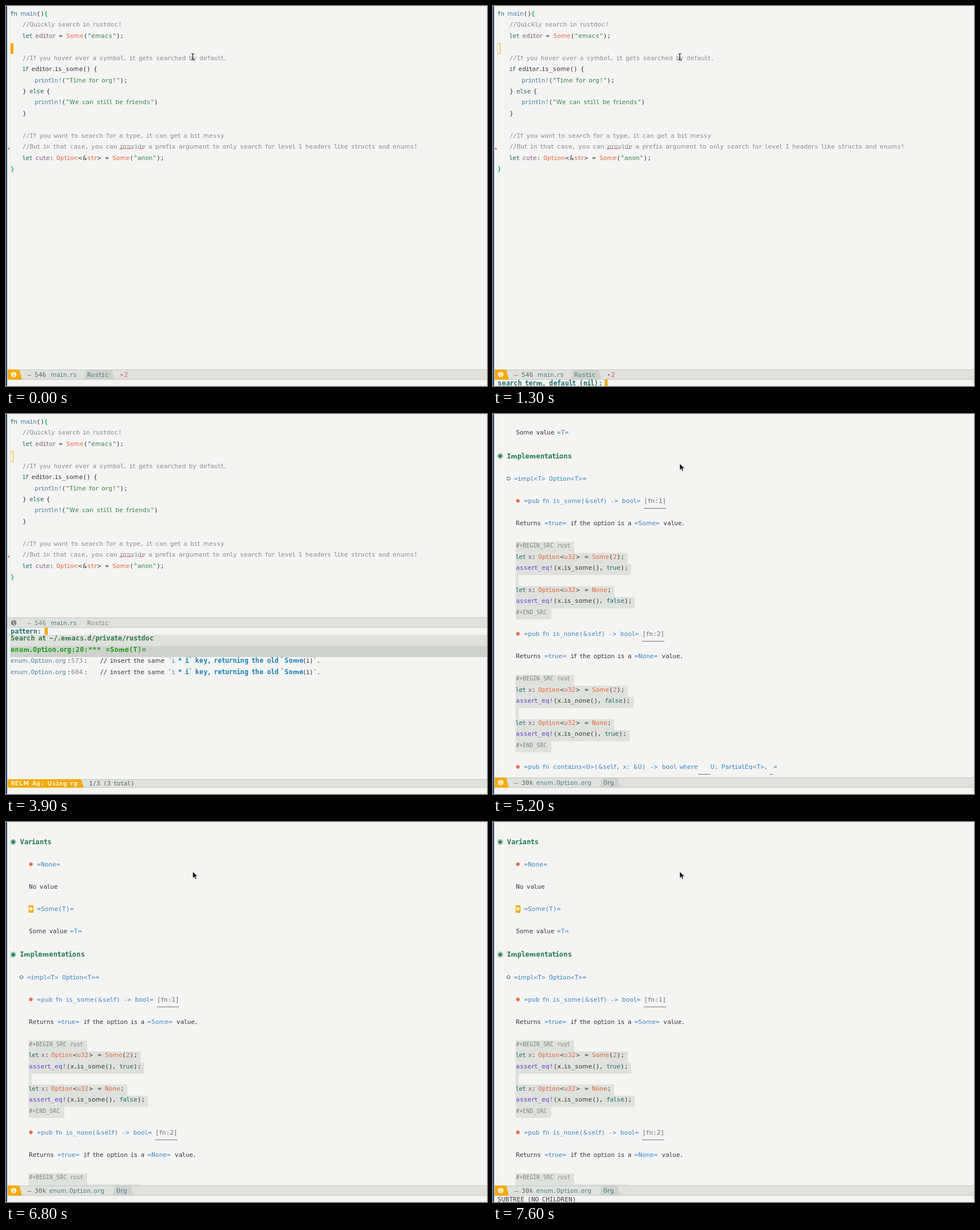
These frames come from a looping animation (841 px wide and 666 px high, 8000 ms). An HTML page:

```html
<!DOCTYPE html>
<html lang="en">
<head>
<meta charset="utf-8">
<title>Rustdoc search</title>
<style>
html, body { margin: 0; width: 100%; height: 100%; overflow: hidden; background: #f4f4f2; }
svg { display: block; }
text { font-family: "DejaVu Sans Mono", "Noto Sans Mono", monospace; text-anchor: middle; }
.wide { font-family: "DejaVu Sans", "Noto Sans", sans-serif; font-size: 90%; }
</style>
</head>
<body>
<svg id="stage" width="841" height="666" viewBox="0 0 841 666"></svg>
<script>
const NS = 'http://www.w3.org/2000/svg';
const stage = document.getElementById('stage');
const BG = '#f4f4f2', BAR = '#dfe1dc', DARK = '#cfd2cc', EDGE = '#c6c9c4', GOLD = '#f2ab0c';
const ROW = 19.43;
const ink = {
  fg: '#353a3c', key: '#1f6f70', fn: '#4a83a3', com: '#859090', vari: '#875a86',
  type: '#e2693f', str: '#35874c', match: '#15bd78', link: '#3a87ca', head: '#237a52',
  mac: '#6b3fd6', dim: '#7d8683', note: '#6b7274', file: '#4d7f8f', mode: '#58696c',
  pink: '#ee4f73', prompt: '#1f6f70', src: '#2f7a43', pick: '#17a01c', hit: '#1f80b8', pale: '#fbf4dc'
};

function add(parent, tag, attrs) {
  const el = document.createElementNS(NS, tag);
  for (const k in attrs) el.setAttribute(k, attrs[k]);
  parent.appendChild(el);
  return el;
}
const group = (parent = stage) => add(parent, 'g', {});
const rect = (g, x, y, width, height, fill) => add(g, 'rect', { x, y, width, height, fill });
const poly = (g, points, fill) => add(g, 'polygon', { points, fill });
const stroke = (g, d, color, w = 1) => add(g, 'path', { d, fill: 'none', stroke: color, 'stroke-width': w });
const show = (g, on) => g.setAttribute('display', on ? 'inline' : 'none');
const move = (g, y) => g.setAttribute('transform', `translate(0 ${y})`);

// Quasi-proportional spacing: a few classes of cell width.
function cell(c) {
  if (' fijlrt.,'.includes(c)) return 5.25;
  if ('mMW'.includes(c)) return 10;
  if (c === '&') return 8.5;
  if ('=<>~'.includes(c)) return 7.2;
  return c === '/' || c === 'I' ? 6.2 : 6.7;
}

// Each glyph is centred in its cell; wide letters use the proportional face.
function write(g, x, y, color, str, opt = {}) {
  const scale = opt.scale || 1;
  const el = add(g, 'text', { y: y + 4, fill: ink[color], 'font-size': opt.size || 11 });
  if (opt.bold) el.setAttribute('font-weight', 'bold');
  for (const part of str.split(/([mMW]+)/).filter(Boolean)) {
    const xs = [];
    for (const c of part) {
      const w = cell(c) * scale;
      xs.push((x + w / 2).toFixed(2));
      x += w;
    }
    const span = add(el, 'tspan', { x: xs.join(' ') });
    if (/[mMW]/.test(part)) span.setAttribute('class', 'wide');
    span.textContent = part;
  }
  return x;
}
const BOLD = { bold: true, scale: 1.1, size: 11.5 };
const HEAD = { bold: true, scale: 1.13, size: 12 };
const SMALL = { scale: 0.9, size: 9.6 };

// Runs are [x, color, text, options]; a null x continues the previous run.
function row(g, y, ...runs) {
  let end = 0;
  for (const [x, color, str, opt] of runs) end = write(g, x === null ? end : x, y, color, str, opt);
}

function badge(g, y, disc, digit) {
  add(g, 'circle', { cx: 13.5, cy: y, r: 4.8, fill: disc });
  add(g, 'text', { x: 13.5, y: y + 2.8, 'font-size': 7.5, 'font-weight': 'bold', fill: digit }).textContent = '1';
}

function bar(g, y, h = 18) {
  rect(g, 2, y, 839, h, BAR);
  rect(g, 2, y, 839, 1, EDGE);
  rect(g, 2, y + h - 1, 839, 1, EDGE);
}

function modeline(g, size, name, mode, x0, x1) {
  bar(g, 637);
  poly(g, '3,637 23,637 28,655 3,655', GOLD);
  badge(g, 646, ink.pale, GOLD);
  poly(g, `${x0 + 4},638 ${x1 - 4},638 ${x1},654 ${x0},654`, DARK);
  row(g, 646, [37.5, 'mode', '–'], [50, 'mode', size], [name[0], 'file', name[1]], [x0 + 6, 'file', mode]);
}

// ---- code buffer ----
const code = group();
const cy = k => 13 + ROW * k;
row(code, cy(0), [8, 'key', 'fn'], [25, 'fn', 'main'], [53.5, 'fg', '()'], [66.8, 'match', '{', { bold: true }]);
row(code, cy(1), [29, 'com', '//Quickly search in rustdoc!']);
row(code, cy(2), [29, 'key', 'let'], [51.2, 'vari', 'editor'], [92, 'fg', '='], [105.5, 'type', 'Some'],
  [135.7, 'fg', '('], [null, 'str', '"emacs"'], [null, 'fg', ');']);
row(code, cy(4), [29, 'com', '//If you hover over a symbol, it gets searched by default.']);
row(code, cy(5), [29, 'key', 'if'], [44.5, 'fg', 'editor.is_some() {']);
row(code, cy(6), [50, 'fn', 'println!'], [97.5, 'fg', '('], [104.2, 'str', '"Time for org!"'], [null, 'fg', ');']);
row(code, cy(7), [29, 'fg', '}'], [41, 'key', 'else'], [70.5, 'fg', '{']);
row(code, cy(8), [50, 'fn', 'println!'], [97.5, 'fg', '('], [104.2, 'str', '"We can still be friends"'], [null, 'fg', ')']);
row(code, cy(9), [29, 'fg', '}']);
row(code, cy(11), [29, 'com', '//If you want to search for a type, it can get a bit messy']);
row(code, cy(12), [29, 'com', '//But in that case, you can provide a prefix argument to only search for level 1 headers like structs and enums!']);
row(code, cy(13), [29, 'key', 'let'], [51.2, 'vari', 'cute'], [76.5, 'fg', ':'], [88.3, 'type', 'Option'],
  [126, 'fg', '<&'], [142, 'type', 'str'], [159.5, 'fg', '>'], [173, 'fg', '='], [186, 'type', 'Some'],
  [216.3, 'fg', '('], [null, 'str', '"anon"'], [null, 'fg', ');']);
row(code, cy(14), [8, 'match', '}', { bold: true }]);
add(code, 'circle', { cx: 5, cy: 250, r: 1.6, fill: ink.pink });
function squiggle(x0, x1) {
  let d = `M${x0} 249.5`;
  for (let x = x0 + 2; x <= x1; x += 2) d += ` L${x} ${x % 4 ? 249.3 : 250.8}`;
  stroke(code, d, ink.pink, 0.9);
}
squiggle(198, 222);
squiggle(232, 240);

const solid = rect(code, 7.5, 65, 5.5, 19, GOLD);
const hollow = stroke(code, 'M7.5 65.5H12.5V83.5H7.5Z', GOLD);
const ibeam = stroke(code, 'M324 83.5Q326.5 83.5 326.5 85V93Q326.5 94.5 324 94.5M329.5 83.5Q326.5 83.5 326.5 85M326.5 93Q326.5 94.5 329.5 94.5', '#222', 1.2);

const codeMode = group(code);
modeline(codeMode, '546', [78, 'main.rs'], 'Rustic', 136, 189);
row(codeMode, 646, [199, 'pink', '•'], [206.5, 'pink', '2']);

const prompt = group(code);
row(prompt, 660.5, [8, 'prompt', 'search term, default (nil):', BOLD]);
const typed = ['', 's', 'som', 'some'].map(str => {
  const g = group(prompt);
  const end = str ? write(g, 195.2, 660.5, 'fg', str) : 195.2;
  rect(g, end, 654.5, 5.2, 11.5, GOLD);
  return g;
});

// ---- search results ----
const helm = group();
bar(helm, 356.5);
badge(helm, 366, '#80868a', BAR);
row(helm, 366, [37.5, 'dim', '–'], [50, 'dim', '546'], [78, 'file', 'main.rs'], [142, 'dim', 'Rustic']);
row(helm, 380.5, [8, 'prompt', 'pattern:', BOLD]);
rect(helm, 67.5, 374.5, 5.5, 12.5, GOLD);
rect(helm, 7, 387, 834, 19.5, BAR);
rect(helm, 7, 406.5, 834, 19.5, DARK);
row(helm, 393.3, [8, 'src', 'Search at ~/.emacs.d/private/rustdoc', BOLD]);
row(helm, 412.5, [8, 'pick', 'enum.Option.org:20:***', BOLD], [174, 'pick', '=Some(T)=', BOLD]);
[['573', 432], ['604', 451.5]].forEach(([num, y]) => row(helm, y,
  [8, 'fn', 'enum.Option.org'], [107, 'fg', ':'], [114, 'dim', num], [136, 'fg', ':'],
  [164.5, 'fg', '// insert the same'], [283.5, 'fg', '`'], [290, 'link', 'i'],
  [300.5, 'hit', '*', BOLD], [313.5, 'hit', 'i`', BOLD], [330.5, 'hit', 'key, returning the old', BOLD],
  [479.5, 'hit', '`Some', BOLD], [518.5, 'fg', '(i)`.']));
bar(helm, 640, 15);
poly(helm, '3,640 131,640 136,655 3,655', GOLD);
row(helm, 646.5, [8.5, 'pale', 'HELM Ag: Using rg', { scale: 1.06, bold: true }], [145, 'mode', '1/3 (3 total)']);

// ---- documentation buffer ----
const org = group();
const upper = group(org), body = group(org), lower = group(org);

function star(g, y, color) {
  let d = '';
  for (let i = 0; i < 4; i++) {
    const a = i * Math.PI / 4, dx = 3.5 * Math.cos(a), dy = 3.5 * Math.sin(a);
    d += `M${43.5 - dx} ${y - dy}L${43.5 + dx} ${y + dy}`;
  }
  stroke(g, d, color, 1.4);
}
function heading(g, y, str) {
  add(g, 'circle', { cx: 12.6, cy: y, r: 4.4, fill: 'none', stroke: ink.head, 'stroke-width': 0.8 });
  add(g, 'circle', { cx: 12.6, cy: y, r: 2.9, fill: ink.head });
  row(g, y, [24.3, 'head', str, HEAD]);
}
function method(y, name, sx, num) {
  star(lower, y, ink.type);
  row(lower, y, [54, 'link', '=pub fn'], [105, 'link', name + '(&self)'], [sx, 'link', '->'],
    [sx + 20.5, 'link', 'bool='], [sx + 59, 'note', `[fn:${num}]`]);
  rect(lower, sx + 58.7, y + 12.5, 39, 1, ink.note);
}
function returns(y, value, end) {
  row(lower, y, [40, 'fg', 'Returns'], [90, 'link', '=true='], [136, 'fg', 'if the option is a'],
    [247, 'link', `=${value}=`], [end, 'fg', 'value.']);
}
function sample(y, name, first, second, tx, edges) {
  const at = k => y + ROW * k;
  edges.forEach((x, k) => rect(lower, 39.5, at(k) - 6.4, x - 39.5, ROW + 0.1, BAR));
  row(lower, y, [40, 'dim', '#+BEGIN_SRC', SMALL], [113, 'dim', 'rust', SMALL]);
  const decl = (k, ...value) => row(lower, at(k), [40, 'key', 'let'], [61.5, 'vari', 'x'], [68, 'fg', ':'],
    [79, 'type', 'Option'], [117, 'fg', '<'], [124, 'type', 'u32'], [145, 'fg', '>'], [160, 'fg', '='], ...value);
  const check = (k, bool) => row(lower, at(k), [40, 'mac', 'assert_eq!', { scale: 1.02 }], [105.7, 'fg', '('],
    [112.4, 'fg', `x.${name}(),`], [tx, 'key', bool], [null, 'fg', ');']);
  decl(1, [173, 'type', 'Some'], [203, 'fg', '('], [null, 'type', '2'], [null, 'fg', ');']);
  check(2, first);
  decl(4, [173, 'type', 'None'], [200, 'fg', ';']);
  check(5, second);
  row(lower, at(6), [40, 'dim', '#+END_SRC', SMALL]);
}

heading(upper, 35, 'Variants');
star(upper, 74, ink.type);
row(upper, 74, [54, 'link', '=None=']);
row(upper, 113, [40, 'fg', 'No value']);
const point = group(upper);
rect(point, 39.5, 146, 8.5, 13, GOLD);
star(point, 152, ink.pale);
row(upper, 152, [54, 'link', '=Some(T)=']);
const dots = group(upper);
row(dots, 152, [120, 'link', '...']);

row(body, 191, [40, 'fg', 'Some value'], [111.5, 'link', '=T=']);

heading(lower, 232.4, 'Implementations');
add(lower, 'circle', { cx: 27, cy: 272, r: 2.8, fill: 'none', stroke: ink.key, 'stroke-width': 1 });
row(lower, 272, [36.5, 'link', '=impl<T>'], [98, 'link', 'Option<T>=']);
method(311, 'is_some', 205, 1);
returns(350, 'Some', 298);
sample(389, 'is_some', 'true', 'false', 199, [142, 235.5, 241.5, 45, 212, 248, 102]);
method(544, 'is_none', 202, 2);
returns(583, 'None', 295);
sample(622, 'is_none', 'false', 'true', 196, [142, 235.5, 246, 45, 212, 239, 102]);
star(lower, 777.2, ink.type);
row(lower, 777.2, [54, 'link', '=pub fn'], [105, 'link', 'contains<U>(&self,'], [227, 'link', 'x:'],
  [245, 'link', '&U)'], [274.5, 'link', '->'], [295.5, 'link', 'bool where'],
  [380.5, 'link', 'U: PartialEq<T>,'], [490, 'link', '=']);
rect(lower, 359, 789.7, 21, 1, ink.note);
rect(lower, 484, 789.7, 5.5, 1, ink.note);

const frame = group();
rect(frame, 0, 655, 841, 11, BG);
modeline(frame, '30k', [75.5, 'enum.Option.org'], 'Org', 187, 222);
add(frame, 'path', { d: 'M326.5 87V98.5L329.2 96L331 100.2L333 99.3L331.2 95.3H335Z', fill: '#111', stroke: '#fff', 'stroke-width': 0.6 });
const folded = group(frame), unfolded = group(frame);
row(folded, 660.5, [8, 'fg', 'FOLDED']);
row(unfolded, 660.5, [8, 'fg', 'SUBTREE (NO CHILDREN)']);

// left window edge
rect(stage, 0, 0, 2, 666, '#2b4a72');
rect(stage, 7, 0, 0.7, 637, '#ebebe8');

function scroll(t) {
  if (t < 6500) return -158.7;
  if (t < 6700) return -139.2;
  return t < 6800 ? -61.5 : 0;
}

function draw(t) {
  const inCode = t < 5200, asking = t >= 1300 && t < 3900, menu = t >= 800 && t < 1300;
  const inHelm = t >= 3900 && inCode, fold = t >= 7400 && t < 7600;
  show(code, inCode);
  show(solid, t < 1300);
  show(hollow, t >= 1300);
  show(ibeam, t < 2700);
  show(codeMode, !inHelm);
  move(codeMode, menu ? -280.5 : 0);
  show(prompt, asking);
  const step = (t >= 2700) + (t >= 2900) + (t >= 3000);
  typed.forEach((g, i) => show(g, i === step));
  show(helm, inHelm);

  show(org, !inCode);
  show(frame, !inCode);
  move(org, scroll(t));
  show(point, t >= 6500);
  show(body, !fold);
  show(dots, fold);
  move(lower, fold ? -2 * ROW : 0);
  show(folded, fold);
  show(unfolded, t >= 7600);
}

function tick() {
  draw(performance.now() % 8000);
  requestAnimationFrame(tick);
}
tick();
</script>
</body>
</html>
```
